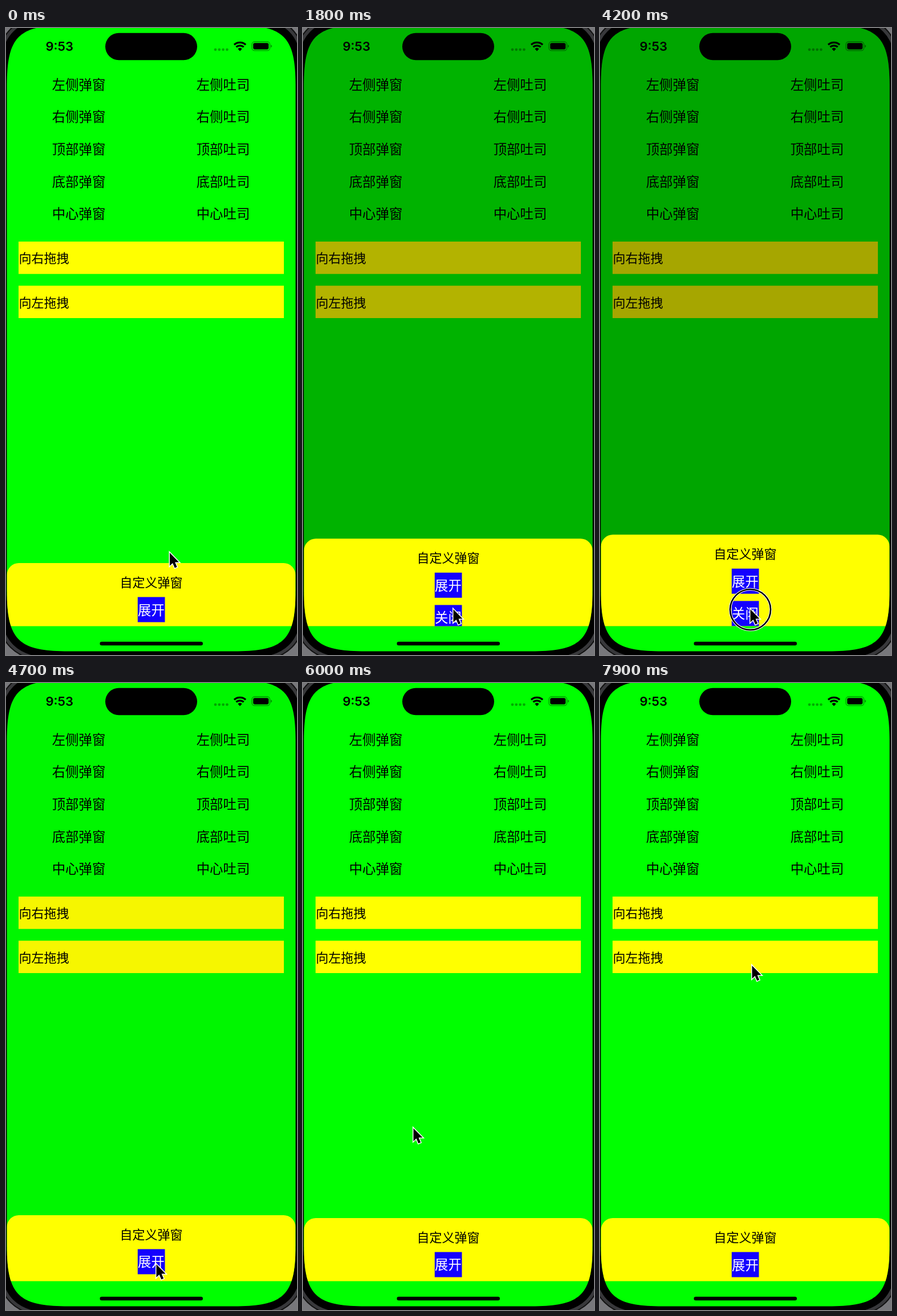
An HTML page for the animation above (8 s loop, 510 px wide and 1098 px high).

```html
<!DOCTYPE html>
<html lang="zh-CN">
<head>
<meta charset="utf-8">
<style>
  html, body { margin: 0; width: 100%; height: 100%; overflow: hidden; background: #77777b; }
  svg { display: block; }
  text { font-family: "Noto Sans CJK SC", "Noto Sans CJK", sans-serif; font-size: 22px; }
  .large { font-size: 23.4px; text-anchor: middle; }
  .clock { font: 600 22px Inter, sans-serif; }
</style>
</head>
<body>
<svg width="510" height="1098" viewBox="0 0 510 1098">
  <defs>
    <path id="outline" d="M1.5 103C1.5 14.5 21 -5 109.5 -5H399.5C488 -5 507.5 14.5 507.5 103V983.5C507.5 1072 488 1091.5 399.5 1091.5H109.5C21 1091.5 1.5 1072 1.5 983.5Z"/>
    <clipPath id="screen"><use href="#outline"/></clipPath>
    <clipPath id="safe"><rect width="510" height="1047.5"/></clipPath>
  </defs>

  <use href="#outline" stroke="#111" stroke-width="42"/>
  <use href="#outline" stroke="#38383b" stroke-width="38"/>
  <use href="#outline" stroke="#000" stroke-width="27"/>

  <g clip-path="url(#screen)">
    <rect y="-5" width="510" height="1103" fill="#0f0"/>
    <g id="menu"></g>
    <text class="clock" x="69.5" y="40">9:53</text>
    <g id="dots" opacity=".33"></g>
    <g fill="none" stroke="#000" stroke-width="3.3">
      <path d="M399.9 29.2a15.2 15.2 0 0 1 20.2 0M403.4 33.3a9.9 9.9 0 0 1 13.2 0"/>
      <path d="M410 40.6l-3.7-4.2a5.6 5.6 0 0 1 7.4 0z" fill="#000" stroke="none"/>
    </g>
    <g opacity=".4">
      <rect x="431" y="24" width="31.5" height="15.6" rx="4.6" fill="none" stroke="#000" stroke-width="1.3"/>
      <path d="M464 29.2q2.2.7 2.2 2.6t-2.2 2.6z"/>
    </g>
    <rect x="433.2" y="26.2" width="27.1" height="11.2" rx="2.8"/>
    <rect id="dim" y="-5" width="510" height="1052.5"/>
    <g clip-path="url(#safe)"><g id="panel">
      <rect x="1.5" width="506" height="220" rx="21" fill="#ff0"/>
      <text x="254.5" y="41.8" text-anchor="middle">自定义弹窗</text>
    </g></g>
    <rect x="164.5" y="1074.8" width="180.5" height="6.4" rx="3.2"/>
  </g>
  <rect x="174" y="8.8" width="161" height="47.4" rx="23.7"/>

  <g id="pointer">
    <g id="ring" fill="none">
      <circle cx="1.5" cy="3" r="35.5" stroke="#fff" stroke-width="4.6"/>
      <circle cx="1.5" cy="3" r="35.5" stroke="#000" stroke-width="2.6"/>
    </g>
    <path d="M1.5 2.5V25.2L6.6 20.4L10.3 29L14.2 27.3L10.6 18.9H17.6Z" stroke="#fff" stroke-width="3" paint-order="stroke"/>
  </g>
</svg>
<script>
const $ = id => document.getElementById(id);
const add = (id, markup) => $(id).insertAdjacentHTML('beforeend', markup);

['左侧', '右侧', '顶部', '底部', '中心'].forEach((side, i) => {
  const y = 107.6 + 56.65 * i;
  add('menu', `<text class="large" x="127.5" y="${y}">${side}弹窗</text>
    <text class="large" x="380.5" y="${y}">${side}吐司</text>`);
});
['向右拖拽', '向左拖拽'].forEach((label, i) => {
  const y = 374 + 77.3 * i;
  add('menu', `<rect x="22" y="${y}" width="465" height="56.7" fill="#ff0"/>
    <text x="22.5" y="${y + 37.2}">${label}</text>`);
});
['展开', '关闭'].forEach((label, i) => {
  const y = 59.5 + 56.65 * i;
  add('panel', `<rect x="230.8" y="${y}" width="47.7" height="44" fill="#1400ff"/>
    <text class="large" x="254.5" y="${y + 31}" fill="#fff">${label}</text>`);
});
for (let i = 0; i < 4; i++) add('dots', `<circle cx="${367 + 6.8 * i}" cy="37.8" r="2.4"/>`);

const LOOP = 8000, STEP = 100, OPEN = 1455, CLOSE = 4110;
const stops = [ // time, x, y of the pointer tip
  [0, 285.5, 916.5], [200, 285.5, 916.5], [1200, 262, 1015.5], [5300, 262, 1015.5],
  [6800, 106.5, 486], [7300, 106.5, 486], [7900, 265, 492.5], [LOOP, 265, 492.5]
];

// Critically damped spring from 0 to 1
const spring = (ms, speed) => {
  const x = Math.max(0, ms) / 1000 * speed;
  return 1 - (1 + x) * Math.exp(-x);
};

function pointerAt(t) {
  const i = stops.findIndex(s => s[0] > t);
  const [t0, x0, y0] = stops[i - 1], [t1, x1, y1] = stops[i];
  const u = (t - t0) / (t1 - t0), k = u * u * (3 - 2 * u);
  return [x0 + (x1 - x0) * k, y0 + (y1 - y0) * k];
}

const start = performance.now();

function draw() {
  const t = Math.floor((performance.now() - start) % LOOP / STEP) * STEP;
  const open = t < CLOSE ? spring(t - OPEN, 7.8) : 1 - spring(t - CLOSE, 6.83);
  const pressed = (t >= 1300 && t < 1500) || (t >= 4000 && t < 4300);
  $('panel').setAttribute('transform', `translate(0 ${937 - 57 * open})`);
  $('dim').setAttribute('opacity', 0.4 * open);
  $('pointer').setAttribute('transform', `translate(${pointerAt(t)})`);
  $('ring').setAttribute('visibility', pressed ? 'visible' : 'hidden');
  requestAnimationFrame(draw);
}
draw();
</script>
</body>
</html>
```
